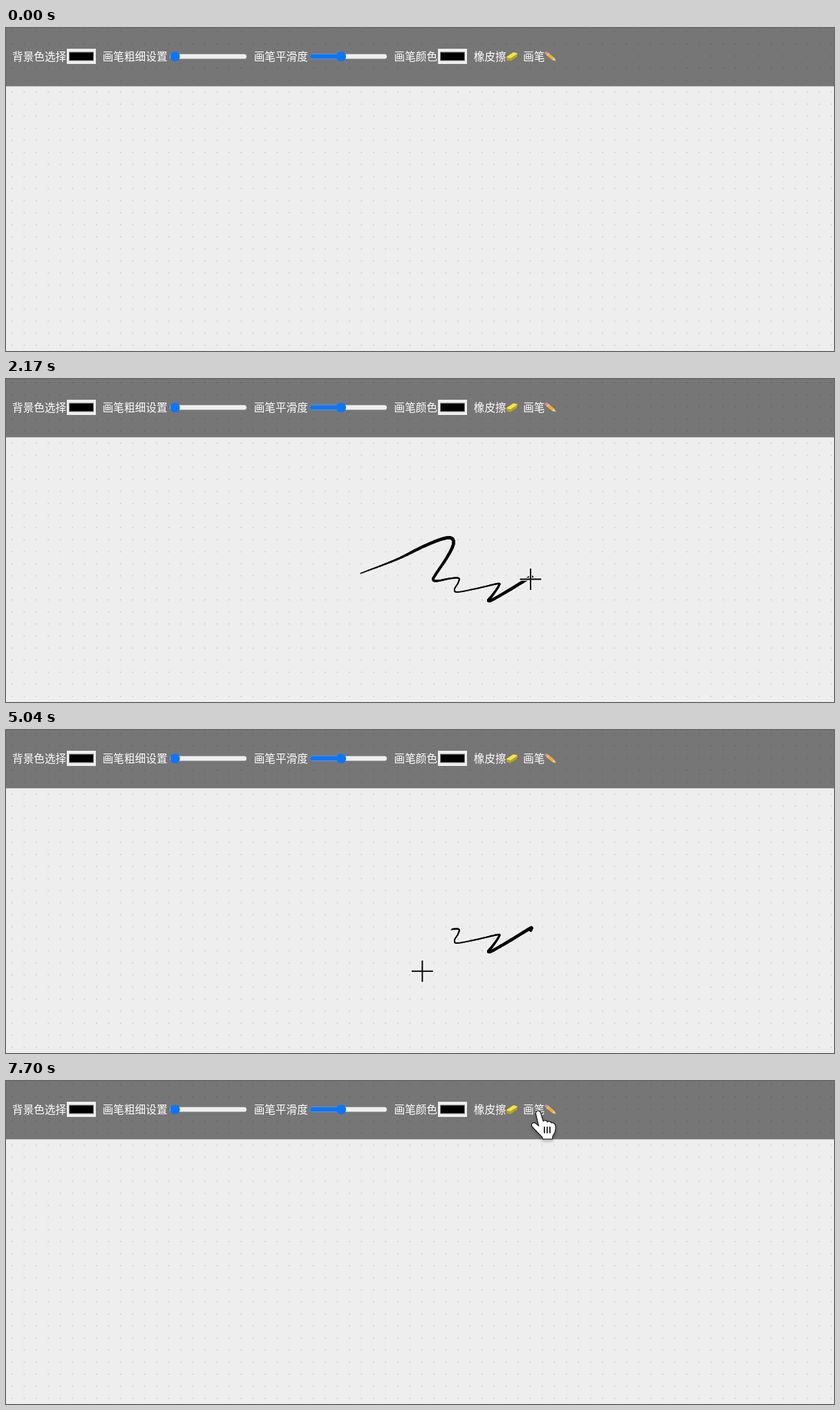
Write an HTML page with a canvas that moves like this. It is 1198 by 467 pixels and loops after 8000 ms.

```html
<!DOCTYPE html>
<html lang="zh">
<head>
<meta charset="utf-8">
<title>画板</title>
<style>
html, body { margin: 0; width: 100%; height: 100%; overflow: hidden; background: #eee; }
svg, canvas { position: absolute; left: 0; top: 0; display: block; }
text { font: 15.65px "Noto Sans CJK SC", "Noto Sans CJK", sans-serif; fill: #fff; }
</style>
</head>
<body>
<svg width="1198" height="467" viewBox="0 0 1198 467">
  <defs>
    <pattern id="dots" x="0.3" y="-3.1" width="17.43" height="17.43" patternUnits="userSpaceOnUse">
      <circle cx="8.7" cy="8.7" r=".8" fill="#b4b4b4"/>
    </pattern>
    <g id="swatch">
      <rect width="42" height="22" fill="#efefef"/>
      <rect x="3.5" y="5" width="35" height="12" stroke="#777"/>
    </g>
    <rect id="track" y="37.8" width="111" height="6.8" rx="3.4" fill="#efefef"/>
    <circle id="thumb" cy="41.2" r="7" fill="#0a75ff"/>
  </defs>
  <rect width="1198" height="467" fill="#eee"/>
  <rect width="1198" height="467" fill="url(#dots)"/>
  <rect width="1198" height="84.3" fill="#000" fill-opacity=".5"/>
  <text x="9" y="46.8">背景色选择</text>
  <use href="#swatch" x="88" y="30"/>
  <text x="139.7" y="46.8">画笔粗细设置</text>
  <use href="#track" x="237"/>
  <use href="#thumb" x="244.5"/>
  <text x="358.7" y="46.8">画笔平滑度</text>
  <use href="#track" x="440"/>
  <rect x="440" y="37.8" width="45" height="6.8" rx="3.4" fill="#0a75ff"/>
  <use href="#thumb" x="485"/>
  <text x="561.5" y="46.8">画笔颜色</text>
  <use href="#swatch" x="625" y="30"/>
  <text x="676.8" y="46.8">橡皮擦</text>
  <g stroke-linejoin="round" stroke-width="1.5">
    <path d="M725 42 734 36 739 37V41L730 47 725 46Z" fill="#b5a51c" stroke="#b5a51c"/>
    <path d="M725 42 734 36 739 37 730 43Z" fill="#f3e34b" stroke="#f3e34b"/>
  </g>
  <text x="748.3" y="46.8">画笔</text>
  <g stroke-width="4.6">
    <path d="M782 36.5 784 38" stroke="#e58b91" stroke-linecap="round"/>
    <path d="M783.5 37.7 785 39" stroke="#c9c9c9"/>
    <path d="M785 39 791.5 44.3" stroke="#f7ac27"/>
    <path d="M793 42.5 795.5 47.7 790 46.1Z" fill="#f2d3a2"/>
  </g>
</svg>
<canvas id="board" width="1198" height="467"></canvas>
<script>
const ctx = document.getElementById('board').getContext('2d');
const LOOP = 8000, TICK = 70, BAR = 84;
const DRAW_START = 1190, DRAW_END = 2170;
const ERASE_START = 4340, ERASE_END = 6580, ERASER = 36;

// Each move: start, end, then evenly timed cursor positions.
const moves = [
  [210, 350, [601, 406], [582, 305], [571, 317]],
  [490, 490, [558, 291]],
  [700, 840, [541, 292], [510, 282]],
  [2380, 3080, [763, 294], [790, 200], [814, 45], [757, 28], [716, 14], [707, 41]],
  [3570, 4060, [706, 42], [626, 120], [510, 276], [502, 274.5]],
  [4340, 5110, [510, 275], [605, 238], [680, 205], [748, 185], [628, 265], [594, 392], [618, 275]],
  [5180, 5950, [593, 288], [655, 286], [638, 331], [690, 300], [728, 262], [703, 290], [701, 298]],
  [6020, 6580, [669, 332], [715, 312], [765, 284], [828, 236], [768, 270]],
  [6860, 7490, [773, 255], [792, 185], [797, 90], [771, 51]],
  [7630, 7700, [770, 48], [769.5, 45]]
];

const stroke = [
  [513, 281], [565, 261], [604, 242], [632, 231], [645, 230.5], [647, 240], [638, 258],
  [622, 282], [618, 290], [624, 292], [642, 288.5], [655, 288], [654, 295], [649, 304],
  [654, 308], [685, 302], [711, 296], [713, 299], [705, 311], [698, 320], [704, 319],
  [730, 304], [757, 287.5], [760, 287], [759, 289.5]
];
// Time and the index of the stroke point reached by then.
const reached = [[1190, 0.4], [1400, 3.4], [1610, 10], [1820, 15.3], [2170, 24]];

const hand = new Path2D('M-2.3 3C-3.5-2 2-3 3.5 1L7.5 14C9 11.5 13 12 13.5 15C16 13 19 14 19.5 16.5' +
  'C22 15 25 17 25 20Q26 28 21 34.5L20.5 38.5H7.5L6.5 35.5Q-3 26-8 20.5C-10 16-5 14.5-2.5 17.5L2 21Z');
const knuckles = new Path2D('M9.5 21.5v8.5m4-8.5v8.5m4-8.5v8.5');

function spline(points, u) {
  const last = points.length - 1;
  const i = Math.max(0, Math.min(last - 1, Math.floor(u))), f = u - i;
  const at = k => points[Math.max(0, Math.min(last, k))];
  const [a, b, c, d] = [at(i - 1), at(i), at(i + 1), at(i + 2)];
  return b.map((v, k) => v + f / 2 * (c[k] - a[k] +
    f * (2 * a[k] - 5 * v + 4 * c[k] - d[k] + f * (3 * (v - c[k]) + d[k] - a[k]))));
}

function tipIndex(t) {
  const k = reached.findIndex(r => r[0] > t);
  if (k < 0) return stroke.length - 1;
  const [a, b] = [reached[k - 1], reached[k]];
  return a[1] + (b[1] - a[1]) * (t - a[0]) / (b[0] - a[0]);
}

// The smoothed ink trails the pointer by one tick.
function penAt(t) {
  const tip = spline(stroke, tipIndex(t)), ahead = spline(stroke, tipIndex(t + TICK));
  return ahead.map((v, k) => v + 0.3 * (v - tip[k]));
}

function cursorAt(t) {
  if (t >= DRAW_START && t <= DRAW_END) return penAt(t);
  const move = moves.filter(m => m[0] <= t).pop();
  if (!move) return null;
  const [start, end, ...points] = move;
  if (t > DRAW_END && end < DRAW_START) return penAt(DRAW_END);
  if (points.length < 2) return points[0];
  return spline(points, Math.min(1, (t - start) / (end - start)) * (points.length - 1));
}

function line(width, color, ...points) {
  ctx.lineWidth = width;
  ctx.strokeStyle = color;
  ctx.beginPath();
  points.forEach(p => ctx.lineTo(p[0], p[1]));
  ctx.stroke();
}

const inkWidth = u => (3.1 + 1.4 * Math.cos((u - 3.8) * Math.PI / 9.2)) * Math.min(1, 0.4 + u * 0.35);

function drawInk(t) {
  const end = tipIndex(t);
  let from = stroke[0];
  for (let u = 0; u < end;) {
    u = Math.min(end, u + 1 / 14);
    const to = spline(stroke, u);
    line(inkWidth(u), '#000', from, to);
    from = to;
  }
}

function erase(t) {
  const trail = [cursorAt(ERASE_START - TICK)];
  for (let s = ERASE_START; s <= Math.min(t, ERASE_END); s += TICK) trail.push(cursorAt(s));
  ctx.globalCompositeOperation = 'destination-out';
  line(ERASER, '#000', ...trail);
  ctx.globalCompositeOperation = 'source-over';
}

function drawCross(x, y) {
  ctx.lineCap = 'butt';
  for (const [width, color, r] of [[4.4, '#fff', 16.5], [2.2, '#111', 15.5]]) {
    line(width, color, [x - r, y], [x + r, y]);
    line(width, color, [x, y - r], [x, y + r]);
  }
}

function drawHand(x, y) {
  ctx.translate(x, y);
  ctx.lineWidth = 2;
  ctx.strokeStyle = '#000';
  ctx.fillStyle = '#fff';
  ctx.shadowColor = 'rgba(0,0,0,.45)';
  ctx.shadowBlur = 4;
  ctx.shadowOffsetY = 2;
  ctx.stroke(hand);
  ctx.shadowColor = 'transparent';
  ctx.fill(hand);
  ctx.lineWidth = 1.6;
  ctx.stroke(knuckles);
}

function render(now) {
  const t = Math.floor(now % LOOP / TICK) * TICK;
  ctx.clearRect(0, 0, 1198, 467);
  ctx.save();
  ctx.lineCap = ctx.lineJoin = 'round';
  if (t >= DRAW_START) drawInk(t);
  if (t >= ERASE_START) erase(t);
  const cursor = cursorAt(t);
  if (cursor) (cursor[1] < BAR ? drawHand : drawCross)(...cursor);
  ctx.restore();
}

const origin = performance.now();
function frame() {
  render(performance.now() - origin);
  requestAnimationFrame(frame);
}
frame();
</script>
</body>
</html>
```
